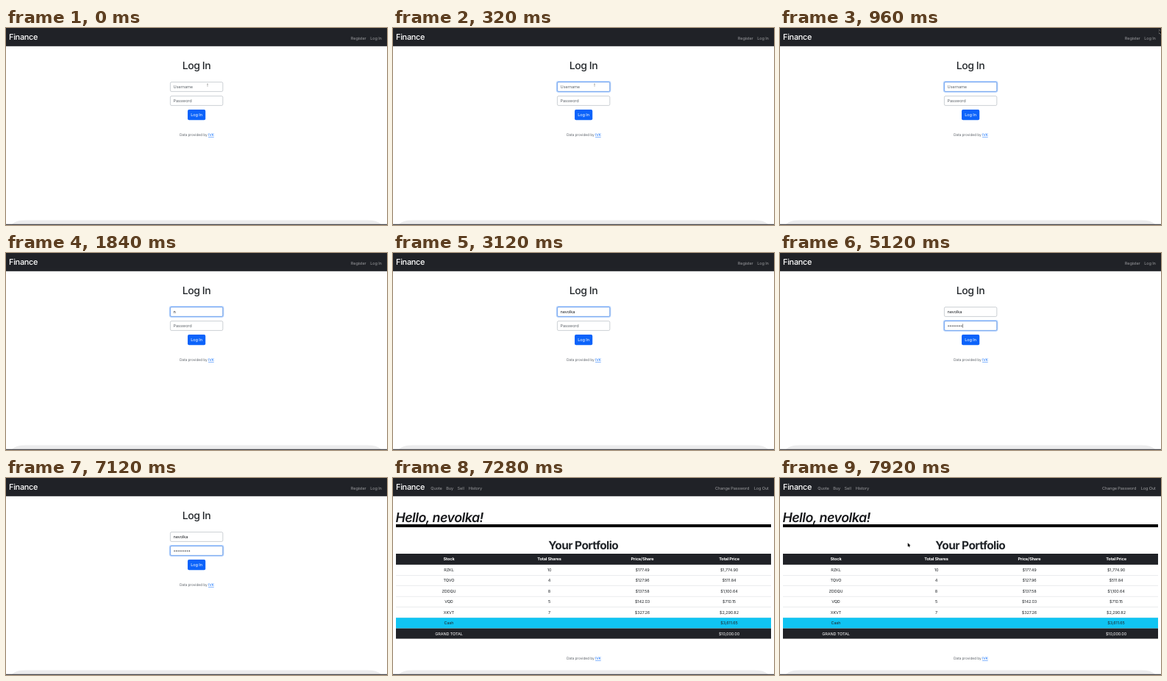
An HTML page that plays this animation: 518 px wide and 268 px high, repeating every 8 s.

```html
<!DOCTYPE html>
<html lang="en">
<head>
<meta charset="utf-8">
<title>Finance</title>
<style>
  html, body { margin: 0; width: 100%; height: 100%; overflow: hidden; background: #fff; }
  svg { display: block; width: 518px; height: 268px; }
  text {
    font: 400 5.6px Inter, "Liberation Sans", sans-serif;
    letter-spacing: -.02em;
    text-rendering: geometricPrecision;
    fill: #212529;
    white-space: pre;
  }
  .mid { text-anchor: middle; }
  .end { text-anchor: end; }
  .nav { fill: #999a9d; }
  .brand { font-size: 10.9px; font-weight: 500; letter-spacing: -.025em; fill: #fff; }
  .login { font-size: 14px; font-weight: 500; letter-spacing: -.03em; }
  .hello { font-size: 17.9px; font-weight: 600; font-style: italic; letter-spacing: -.03em; fill: #17181b; }
  .title { font-size: 15.4px; font-weight: 700; letter-spacing: -.035em; }
  .foot { font-size: 4.9px; fill: #60666c; }
  .foot tspan { fill: #0d6efd; text-decoration: underline; }
  .cell { font-size: 5.5px; }
  .head { font-weight: 700; }
  .light { fill: #fff; }
  .hint { fill: #62686e; }
</style>
</head>
<body>
<svg id="stage" viewBox="0 0 518 268"></svg>
<script>
const LOOP = 8000, STEP = 80, DARK = '#202227';
const USER = 'nevolka';

// Times at which each character appears
const KEYS = [1840, 2000, 2160, 2320, 2480, 2640, 2800];
const DOTS = [3680, 3840, 4000, 4160, 4400, 4560, 4800, 5120, 5520, 5600];
const ERASE = 6080;
const CARET = [[5120, 5520], [5600, 6080], [6240, 6640]];
const FOCUS = 160, TAB = 3200, FADE = 160, ENTER = 7280;

// Pointer runs: time, x, y
const RUNS = [
  [[720, 274, 77], [960, 515.5, 2.5], [1120, 512, 6], [1440, 380, 62], [1760, 263, 112]],
  [[7440, 218, 136], [7600, 196, 112], [7840, 173.7, 88.3], [8000, 173.7, 88.3]]
];

const ROWS = [
  ['RZKL', '10', '$177.49', '$1,774.90'],
  ['TQVO', '4', '$127.96', '$511.84'],
  ['ZODQU', '8', '$137.58', '$1,100.64'],
  ['VQD', '5', '$142.03', '$710.15'],
  ['XKVT', '7', '$327.26', '$2,290.82'],
  ['Cash', '', '', '$3,611.65'],
  ['GRAND TOTAL', '', '', '$10,000.00']
];
const COLS = [76, 212.5, 339, 457];

const stage = document.getElementById('stage');

function add(parent, tag, attrs, content) {
  const el = document.createElementNS('http://www.w3.org/2000/svg', tag);
  for (const k in attrs) el.setAttribute(k, attrs[k]);
  if (content !== undefined) el.textContent = content;
  parent.appendChild(el);
  return el;
}
const rect = (p, x, y, width, height, fill, more) =>
  add(p, 'rect', { x, y, width, height, fill, ...more });
const label = (p, x, y, str, cls = '') => add(p, 'text', { x, y, class: cls }, str);
const show = (el, on) => el.setAttribute('visibility', on ? 'visible' : 'hidden');

function footer(p, y) {
  const el = label(p, 259.3, y, 'Data provided by ', 'foot mid');
  add(el, 'tspan', {}, 'IVK');
}

function field(p, y) {
  const ring = rect(p, 222.6, y - .6, 73, 14.2, 'none',
    { rx: 2.2, stroke: '#0d6efd', 'stroke-opacity': .3, 'stroke-width': 1.4 });
  rect(p, 223.4, y + .2, 71.4, 12.8, '#fff', { rx: 1.6, stroke: '#bfc4ca', 'stroke-width': .8 });
  const edge = rect(p, 223.4, y + .2, 71.4, 12.8, 'none',
    { rx: 1.6, stroke: '#6fa5f8', 'stroke-width': .9 });
  return a => [ring, edge].forEach(el => el.setAttribute('opacity', a));
}

// Shared frame
rect(stage, 0, 0, 518, 268, '#fff');
rect(stage, 0, 0, 518, 24.8, DARK);
label(stage, 4, 16.4, 'Finance', 'brand');
add(stage, 'path', { d: 'M8 267Q14 261.6 26 261.6H492Q504 261.6 510 267Z', fill: '#ececed' });
rect(stage, 0, 266.8, 518, 1.2, '#47474b');

// Log-in page
const login = add(stage, 'g', {});
label(login, 489.6, 15.7, 'Register', 'nav end');
label(login, 510.8, 15.7, 'Log In', 'nav end');
label(login, 258.9, 56.2, 'Log In', 'login mid');
const focusUser = field(login, 73.4);
const focusPass = field(login, 92.4);
const userHint = label(login, 227.6, 82.1, 'Username', 'hint');
const userText = label(login, 227.6, 82.1, '');
const passHint = label(login, 227.6, 101.1, 'Password', 'hint');
const dots = DOTS.map((_, i) =>
  add(login, 'circle', { cx: 229 + 2.55 * i, cy: 99.2, r: .75, fill: '#212529' }));
const caret = rect(login, 0, 96.4, .5, 5.4, '#212529');
rect(login, 247, 111, 24.2, 14.2, '#0c63fa', { rx: 1.9 });
label(login, 259.1, 120.1, 'Log In', 'light mid');
footer(login, 147.1);

// Portfolio page
const home = add(stage, 'g', {});
[['Quote', 51.3], ['Buy', 72.2], ['Sell', 87.6], ['History', 102.8]]
  .forEach(([str, x]) => label(home, x, 15.7, str, 'nav'));
label(home, 484.3, 15.7, 'Change Password', 'nav end');
label(home, 510.8, 15.7, 'Log Out', 'nav end');
label(home, 3.4, 59.6, `Hello, ${USER}!`, 'hello');
rect(home, 4, 63, 510, 4, '#000');
label(home, 258.8, 96.7, 'Your Portfolio', 'title mid');
rect(home, 4, 103, 510, 14.9, DARK);
['Stock', 'Total Shares', 'Price/Share', 'Total Price']
  .forEach((str, i) => label(home, COLS[i], 112.2, str, 'head light mid'));
ROWS.forEach((row, r) => {
  const y = 117.9 + 14.45 * r;
  if (r === 5) rect(home, 4, y, 510, 14.45, '#10c4f2');
  else if (r === 6) rect(home, 4, y, 510, 14, DARK);
  else rect(home, 4, y + 14.1, 510, .5, '#d5d9dd');
  row.forEach((str, i) => str &&
    label(home, COLS[i], y + 9.1, str, r === 6 ? 'cell light mid' : 'cell mid'));
});
footer(home, 247);

// Pointers
const beam = add(stage, 'path', {
  d: 'M273 76.2h2M274 76.2v3.6', fill: 'none', stroke: '#777', 'stroke-width': .5
});
const arrow = add(stage, 'path', {
  d: 'M0 0V5.2L1.2 4.1L2 5.9L2.9 5.5L2.1 3.8H3.7Z',
  fill: '#000', stroke: '#fff', 'stroke-width': .5, 'paint-order': 'stroke'
});

const ramp = (t, from) => Math.min(1, Math.max(0, (t - from) / FADE));
const count = (list, t) => list.filter(k => t >= k).length;

function pointer(t) {
  for (const run of RUNS) {
    for (let i = 1; i < run.length; i++) {
      const [t0, x0, y0] = run[i - 1], [t1, x1, y1] = run[i];
      if (t < t0 || t > t1) continue;
      const k = (t - t0) / (t1 - t0), e = k * k * (3 - 2 * k);
      return [x0 + (x1 - x0) * e, y0 + (y1 - y0) * e];
    }
  }
  return null;
}

function draw(t) {
  const inside = t >= ENTER;
  login.style.display = inside ? 'none' : '';
  home.style.display = inside ? '' : 'none';

  const typed = count(KEYS, t);
  userText.textContent = USER.slice(0, typed);
  show(userHint, !typed);

  const masked = count(DOTS, t) - (t >= ERASE ? 1 : 0);
  dots.forEach((d, i) => show(d, i < masked));
  show(passHint, !masked);
  show(caret, CARET.some(([a, b]) => t >= a && t < b));
  caret.setAttribute('x', 228 + 2.55 * masked);

  const moved = ramp(t, TAB);
  focusUser(ramp(t, FOCUS) - moved);
  focusPass(moved);

  show(beam, t < 720);
  const p = pointer(t);
  show(arrow, p);
  if (p) arrow.setAttribute('transform', `translate(${p[0]} ${p[1]})`);
}

const start = performance.now();
function tick() {
  const t = (performance.now() - start) % LOOP;
  draw(Math.floor(t / STEP) * STEP);
  requestAnimationFrame(tick);
}
tick();
</script>
</body>
</html>
```
